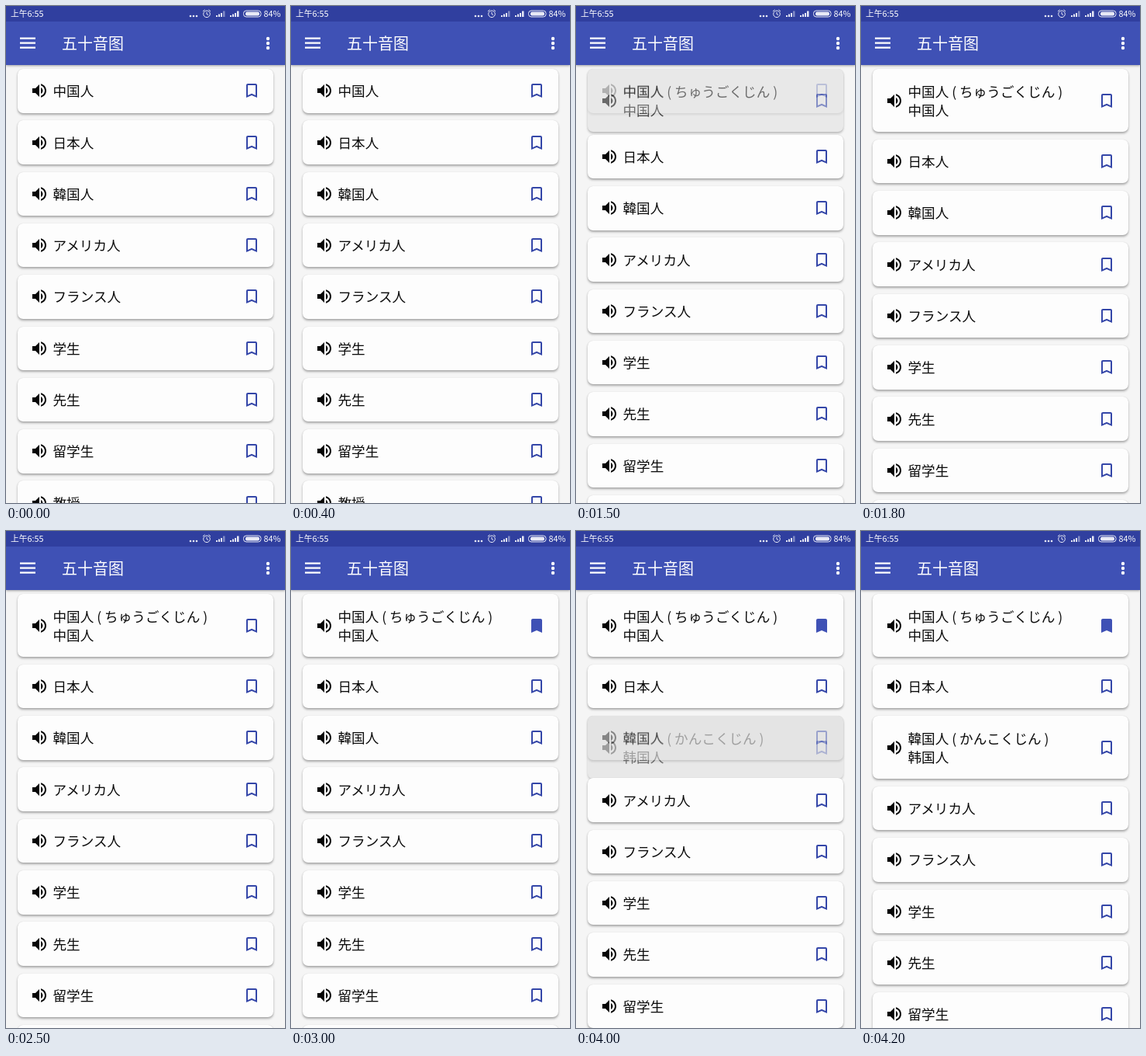
These frames come from a looping animation (360 by 640 pixels, 4300 ms). An HTML page:

```html
<!DOCTYPE html>
<html lang="ja">
<head>
<meta charset="utf-8">
<style>
  html, body { margin: 0; width: 100%; height: 100%; overflow: hidden; }
  body { position: relative; background: #f5f5f5; font-family: "Noto Sans CJK SC", "Noto Sans CJK JP", "Noto Sans CJK", sans-serif; }
  header { position: absolute; z-index: 2; inset: 0 0 auto; height: 76px; background: #3f51b5; box-shadow: 0 1px 3px rgba(0, 0, 0, .35); }
  header svg { position: absolute; left: 0; top: 0; }
  header text { fill: #fff; }
  .item { position: absolute; left: 15px; width: 330px; --tint: 0%; }
  .face {
    position: absolute; top: 0; left: 0; width: 330px; height: 56.5px; border-radius: 7px;
    display: flex; align-items: center;
    background: color-mix(in srgb, #dedede var(--tint), #fdfdfd);
    box-shadow: 0 2px 3px rgba(0, 0, 0, .32), 0 0 1px rgba(0, 0, 0, .15);
  }
  .face.open { height: 81px; opacity: 0; }
  .face svg { position: absolute; top: calc(50% - 12px); width: 24px; height: 24px; }
  .speaker { left: 16px; fill: #050505; }
  .mark { left: 290px; fill: #3446a8; }
  .mark.full { fill: #3f51b5; opacity: 0; }
  .label { margin-left: 45.5px; font-size: 17.6px; line-height: 24px; color: #0c0c0c; white-space: pre; }
</style>
</head>
<body>
<header>
  <svg width="360" height="76" fill="#fff">
    <rect width="360" height="20" fill="#303f9f"/>
    <g fill="#e8eaf6">
      <text x="6" y="14" font-size="10.8">上午6:55</text>
      <text x="332.5" y="14" font-size="10.8">84%</text>
      <circle cx="238" cy="13" r="1.3"/><circle cx="242" cy="13" r="1.3"/><circle cx="246" cy="13" r="1.3"/>
      <path d="M271 12h2v2h-2zM274 10.5h2v3.5h-2zM277 9h2v5h-2z"/>
      <path d="M280 6.5h2.5v7.500h-2.5z" opacity=".45"/>
      <path d="M289 12h2v2h-2zM292 10.5h2v3.5h-2zM295 9h2v5h-2zM298 6.5h2.5v7.5h-2.5z"/>
      <rect x="309" y="7.5" width="18" height="5" rx="2"/>
    </g>
    <g fill="none" stroke="#e8eaf6">
      <circle cx="259" cy="10.3" r="4.3"/>
      <path d="M259 7.8v2.7l2 1M254 7l2.5-2.3M264 7l-2.5-2.3"/>
      <rect x="306.5" y="6" width="22.5" height="8" rx="3.5"/>
    </g>
    <path d="M18 40.5h20v2.2H18zM18 46.5h20v2.2H18zM18 52.5h20v2.2H18z"/>
    <circle cx="338" cy="42" r="2.2"/><circle cx="338" cy="48" r="2.2"/><circle cx="338" cy="54" r="2.2"/>
    <text x="72" y="55.5" font-size="20">五十音图</text>
  </svg>
</header>
<main></main>
<script>
const LOOP = 4300, STEP = 100, FADE = 250;
const TOP = 81, PITCH = 66.3, GROWTH = 24.5;
const words = ['中国人', '日本人', '韓国人', 'アメリカ人', 'フランス人', '学生', '先生', '留学生', '教授'];
const details = {
  0: { start: 1333, text: '中国人 ( ちゅうごくじん )\n中国人' },
  2: { start: 3864, text: '韓国人 ( かんこくじん )\n韩国人' }
};
const BOOKMARK_START = 2660;

const icon = (cls, d) => `<svg class="${cls}" viewBox="0 0 24 24"><path d="${d}"/></svg>`;
const speaker = icon('speaker', 'M3 9v6h4l5 5V4L7 9H3zm13.5 3c0-1.77-1.02-3.29-2.5-4.03v8.05c1.48-.73 2.5-2.25 2.5-4.02zM14 3.23v2.06c2.89.86 5 3.54 5 6.71s-2.11 5.85-5 6.71v2.06c4.01-.91 7-4.49 7-8.77s-2.99-7.86-7-8.77z');
const ribbon = 'M17 3H7c-1.1 0-2 .9-2 2v16l7-3 7 3V5c0-1.1-.9-2-2-2z';
const outline = icon('mark', ribbon + 'm0 15l-5-2.18L7 18V5h10v13z');
const filled = icon('mark full', ribbon);
const face = (cls, text, marks) =>
  `<div class="face ${cls}">${speaker}<div class="label">${text}</div>${marks}</div>`;

// The closed face lies on top, so it stays visible while it fades out.
const list = document.querySelector('main');
list.innerHTML = words.map((word, i) => `<div class="item">${
  details[i] ? face('open', details[i].text, outline + filled) : ''}${face('closed', word, outline)}</div>`).join('');
const items = [...list.children];
const fullMark = items[0].querySelector('.full');
const emptyMark = items[0].querySelector('.open .mark');

const progress = (t, start) =>
  (1 - Math.cos(Math.PI * Math.min(1, Math.max(0, (t - start) / FADE)))) / 2;
const hump = p => 4 * p * (1 - p);

function draw(t) {
  const marked = progress(t, BOOKMARK_START);
  fullMark.style.opacity = marked;
  emptyMark.style.opacity = 1 - marked;
  let shift = 0;
  items.forEach((item, i) => {
    item.style.top = TOP + PITCH * i + shift + 'px';
    if (!details[i]) return;
    const opened = progress(t, details[i].start);
    const tint = Math.max(hump(opened), i === 0 ? hump(marked) : 0);
    item.style.setProperty('--tint', tint * 100 + '%');
    item.querySelector('.closed').style.opacity = 1 - opened;
    item.querySelector('.open').style.opacity = opened;
    shift += GROWTH * opened;
  });
}

// The picture advances ten times a second.
const origin = performance.now();
function tick() {
  const t = (performance.now() - origin) % LOOP;
  draw(Math.floor(t / STEP) * STEP);
  requestAnimationFrame(tick);
}
draw(0);
requestAnimationFrame(tick);
</script>
</body>
</html>
```
